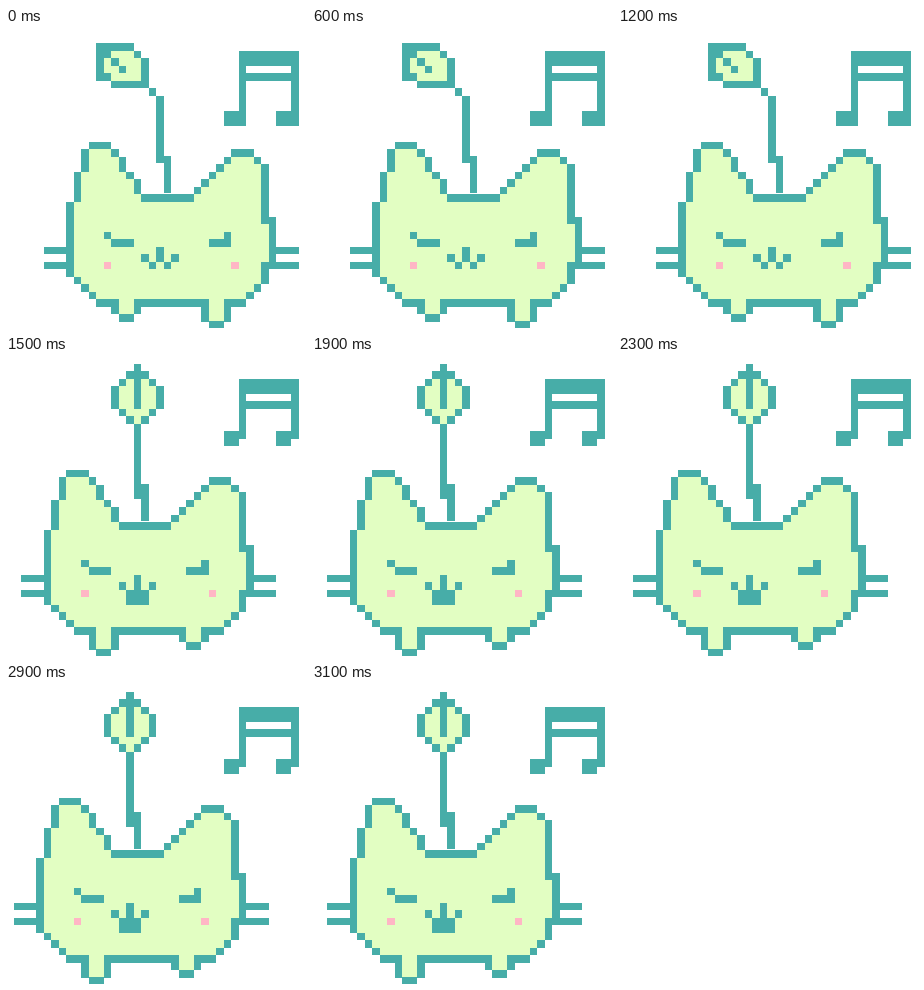
An HTML page with a canvas that plays this animation: 300 px wide and 300 px high, repeating every 3.3 s.

```html
<!DOCTYPE html>
<html lang="en">
<head>
<meta charset="utf-8">
<title>Dancing sprout cat</title>
<style>
html, body { margin: 0; width: 100%; height: 100%; overflow: hidden; background: #fff; }
canvas { display: block; width: 300px; height: 300px; }
</style>
</head>
<body>
<canvas id="stage" width="300" height="300"></canvas>
<script>
const ctx = document.getElementById('stage').getContext('2d');
const SIZE = 300, CELL = 7.5, LOOP = 3300, SLOW = 1500;
const TEAL = '#47ada8', LIME = '#e2fec2', PINK = '#ffb6c5';
const snap = n => Math.round(n * CELL);
const FLOOR = snap(39);
let shift = 0; // sideways, in cells
let drop = 0;  // downwards, in pixels

// Rectangle in cells, snapped to whole pixels.
function box(x, y, w, h, color = TEAL) {
  const left = snap(x + shift), right = snap(x + shift + w);
  const top = Math.min(snap(y) + drop, FLOOR), bottom = snap(y + h) + drop;
  ctx.fillStyle = color;
  ctx.fillRect(left, top, right - left, bottom - top);
}

// Box plus its reflection across the middle of the cat.
function pair(x, y, w, h, color) {
  box(x, y, w, h, color);
  box(44 - x - w, y, w, h, color);
}

// Every cell along straight or diagonal runs between the points.
function walk(points) {
  const cells = [points[0]];
  for (const [tx, ty] of points.slice(1)) {
    let [x, y] = cells[cells.length - 1];
    while (x !== tx || y !== ty) {
      x += Math.sign(tx - x);
      y += Math.sign(ty - y);
      cells.push([x, y]);
    }
  }
  return cells;
}

function line(...points) {
  for (const [x, y] of walk(points)) box(x, y, 1, 1);
}

// Outline with each row filled from its first to its last cell.
function blob(...points) {
  const rows = new Map();
  for (const [x, y] of walk(points)) {
    const [a, b] = rows.get(y) || [x, x];
    rows.set(y, [Math.min(a, x), Math.max(b, x)]);
  }
  for (const [y, [a, b]] of rows) box(a, y, b - a + 1, 1, LIME);
  line(...points);
}

function foot(x, y) {
  blob([x, 36], [x, y], [x + 1, y + 1], [x + 2, y + 1], [x + 3, y], [x + 3, 36]);
}

function cat(low) {
  // ears, then body
  blob([9, 22], [9, 19], [10, 18], [10, 16], [11, 15], [13, 15],
       [15, 17], [15, 18], [17, 20], [17, 21]);
  blob([25, 21], [30, 16], [32, 16], [34, 18], [34, 21]);
  blob([9, 22], [8, 23], [8, 32], [12, 36], [31, 36], [34, 33],
       [34, 31], [35, 31], [35, 25], [34, 25], [34, 22]);
  line([18, 22], [24, 22]);
  foot(14, low ? 37 : 38);
  foot(26, low ? 38 : 37);

  // whiskers and cheeks
  for (const y of [29, 31]) pair(5, y, 3, 1);
  pair(13, 31, 1, 1, PINK);

  // eyes
  line([13, 27], [14, 28], [16, 28]);
  line([27, 28], [29, 28], [29, 27]);

  // nose and mouth
  box(20, 29, 1, 2);
  for (const side of [-1, 1]) line([20 + 2 * side, 30], [20 + side, 31]);
  if (!low) box(19, 31, 3, 2);
}

function droopingLeaf() {
  blob([14, 7], [13, 6], [12, 6], [12, 2], [16, 2], [18, 4], [18, 7], [14, 7]);
  box(13, 3, 1, 1);
  line([14, 4], [15, 5]);
  line([19, 8], [20, 9], [20, 17]);
}

function uprightLeaf() {
  for (let y = 1; y < 9; y++) {
    const half = Math.min(3, 4 - Math.abs(y - 5));
    box(20 - half, y, 2 * half + 1, 1, LIME);
    box(20 - half, y, 1, 1);
    box(20 + half, y, 1, 1);
  }
  box(20, 1, 1, 6);
  box(20, 9, 1, 10);
}

function note(low) {
  box(31, 3, 8, 2);
  box(31, 6, 8, 1);
  for (const x of [31, 38]) {
    box(x, 3, 1, low ? 10 : 8);
    box(x - 2, low ? 11 : 10, 2, 2);
  }
}

function draw(pose) {
  const low = pose === 0;
  ctx.fillStyle = '#fff';
  ctx.fillRect(0, 0, SIZE, SIZE);
  shift = drop = 0;
  note(low);
  shift = [0, -3, -4][pose];
  drop = 1;
  cat(low);
  drop = 0;
  if (low) droopingLeaf();
  else uprightLeaf();
  box(21, 17, 1, 5);
}

// Slow sway first, then a quick shuffle.
function poseAt(t) {
  return t < SLOW
    ? Math.floor(t / 300) % 2
    : 1 + Math.floor((t - SLOW) / 200) % 2;
}

let shown = -1;
function tick() {
  const pose = poseAt(performance.now() % LOOP);
  if (pose !== shown) draw(shown = pose);
  requestAnimationFrame(tick);
}
tick();
</script>
</body>
</html>
```
